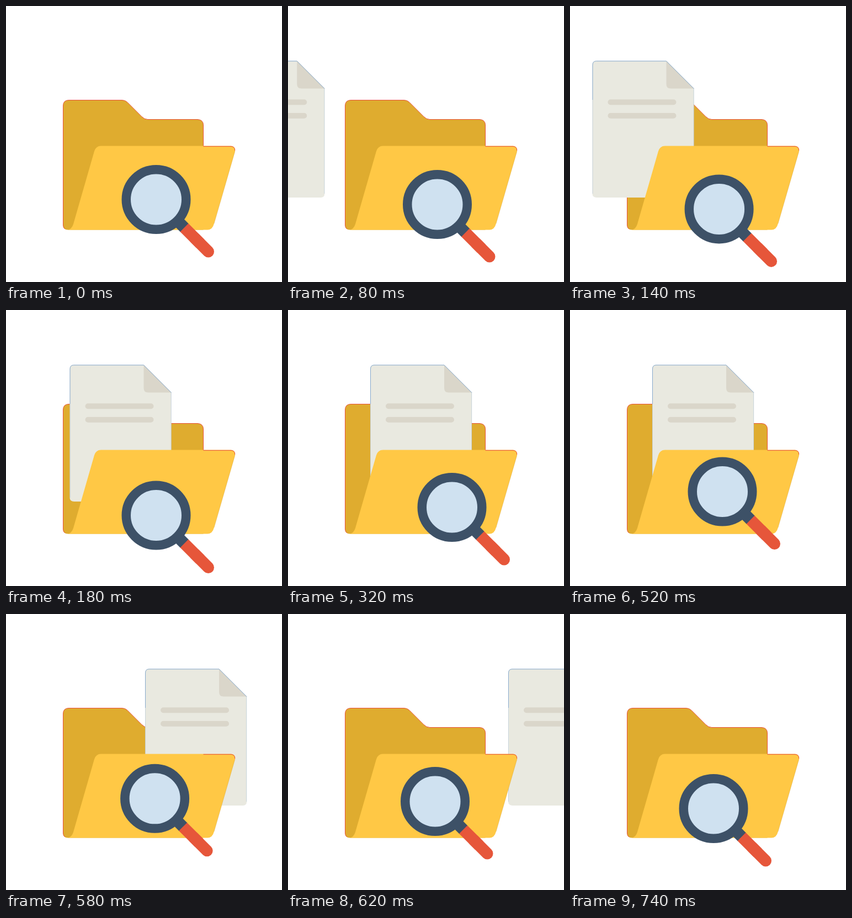
These frames come from a looping animation (500 px wide and 500 px high, 0.82 s). An HTML page:

```html
<!DOCTYPE html>
<html lang="en">
<head>
<meta charset="utf-8">
<title>Folder search</title>
<style>
  html, body { margin: 0; width: 100%; height: 100%; overflow: hidden; background: #fff; }
  svg { display: block; width: 100vw; height: 100vh; }
</style>
</head>
<body>
<svg viewBox="0 0 500 500" fill="none">
  <path fill="#dfac2f" d="M103.5 397V181Q103.5 170.5 114 170.5H210Q216 170.5 220 174.5L246 200.5Q251 205.5 257 205.5H347Q357.5 206 357.5 216V405.5H112Q103.5 405.5 103.5 397Z"/>
  <path stroke="#e8503a" d="M107 404Q103.5 402 103.5 397V181Q103.5 170.5 114 170.5H210Q216 170.5 220 174.5L246 200.5Q251 205.5 257 205.5H347Q357.5 206 357.5 216V254"/>

  <g id="paper">
    <path fill="#e9e9e0" d="M0 340V107Q0 99.5 7 99.5H134L184 149.5V340Q184 347 177 347H8Q0 347 0 340Z"/>
    <path fill="#dad6ca" d="M134 99.5L184 149.5H142Q134 149.5 134 141.5Z"/>
    <path stroke="#dad6ca" stroke-width="10" stroke-linecap="round" d="M33 174.3H147M33 198.7H147"/>
    <path stroke="#86a9cc" d="M.5 170V107Q.5 99.8 7 99.8H134L184 149.8"/>
    <path stroke="#86a9cc" stroke-opacity=".35" d="M.5 170V340M183.7 150V340"/>
  </g>

  <path fill="#ffc845" d="M111 405.5Q119 405 122 395L160 263Q163 253.5 172 253.5H408Q416 254.500 415 263L377 394Q374 405.500 365 405.500Z"/>
  <path stroke="#e8503a" d="M357.500 254.300H408Q415 255 414.700 262"/>
  <path stroke="#c99a3a" stroke-opacity=".5" stroke-width=".7" d="M414.700 263L377 394"/>

  <g id="glass">
    <path stroke="#3d5167" stroke-width="21" d="M35 35L51.500 51.500"/>
    <path stroke="#e6563a" stroke-width="21" stroke-linecap="round" d="M70 70L94.500 94.500"/>
    <path stroke="#e6563a" stroke-width="21" d="M51 51L80 80"/>
    <circle r="54.250" fill="#cfe1f0" stroke="#3d5167" stroke-width="16.500"/>
  </g>
</svg>
<script>
  const LOOP = 820, STEP = 20, LAST = 740;
  const paper = document.getElementById('paper');
  const glass = document.getElementById('glass');

  // Waypoints of the magnifier's orbit: time, x, y
  const orbit = [
    [0, 272, 350.5], [80, 270.5, 359.5], [180, 272, 372],
    [250, 287, 369.5], [320, 297, 357.5], [420, 293.5, 337.5],
    [520, 276, 329], [620, 266.5, 339.5], [740, 260, 352.5]
  ];

  function slope(i, axis) {
    const a = orbit[Math.max(i - 1, 0)];
    const b = orbit[Math.min(i + 1, orbit.length - 1)];
    return (b[axis] - a[axis]) / (b[0] - a[0]);
  }

  // Cubic Hermite curve through the waypoints
  function orbitAt(t, axis) {
    let i = 0;
    while (i < orbit.length - 2 && t >= orbit[i + 1][0]) i++;
    const a = orbit[i], b = orbit[i + 1], span = b[0] - a[0];
    const u = (t - a[0]) / span, v = 1 - u;
    return a[axis] * v * v * (1 + 2 * u) + b[axis] * u * u * (1 + 2 * v)
      + span * u * v * (slope(i, axis) * v - slope(i + 1, axis) * u);
  }

  function ease(t, start, duration) {
    const u = Math.min(Math.max((t - start) / duration, 0), 1);
    return (1 - Math.cos(Math.PI * u)) / 2;
  }

  function draw(now) {
    const t = Math.min(Math.floor(now % LOOP / STEP) * STEP, LAST);
    const paperX = -351 + 500 * (ease(t, -55, 282) + ease(t, 520, 200));
    paper.setAttribute('transform', `translate(${paperX} 0)`);
    glass.setAttribute('transform', `translate(${orbitAt(t, 1)} ${orbitAt(t, 2)})`);
  }

  const origin = performance.now();
  function tick() {
    draw(performance.now() - origin);
    requestAnimationFrame(tick);
  }
  tick();
</script>
</body>
</html>
```
